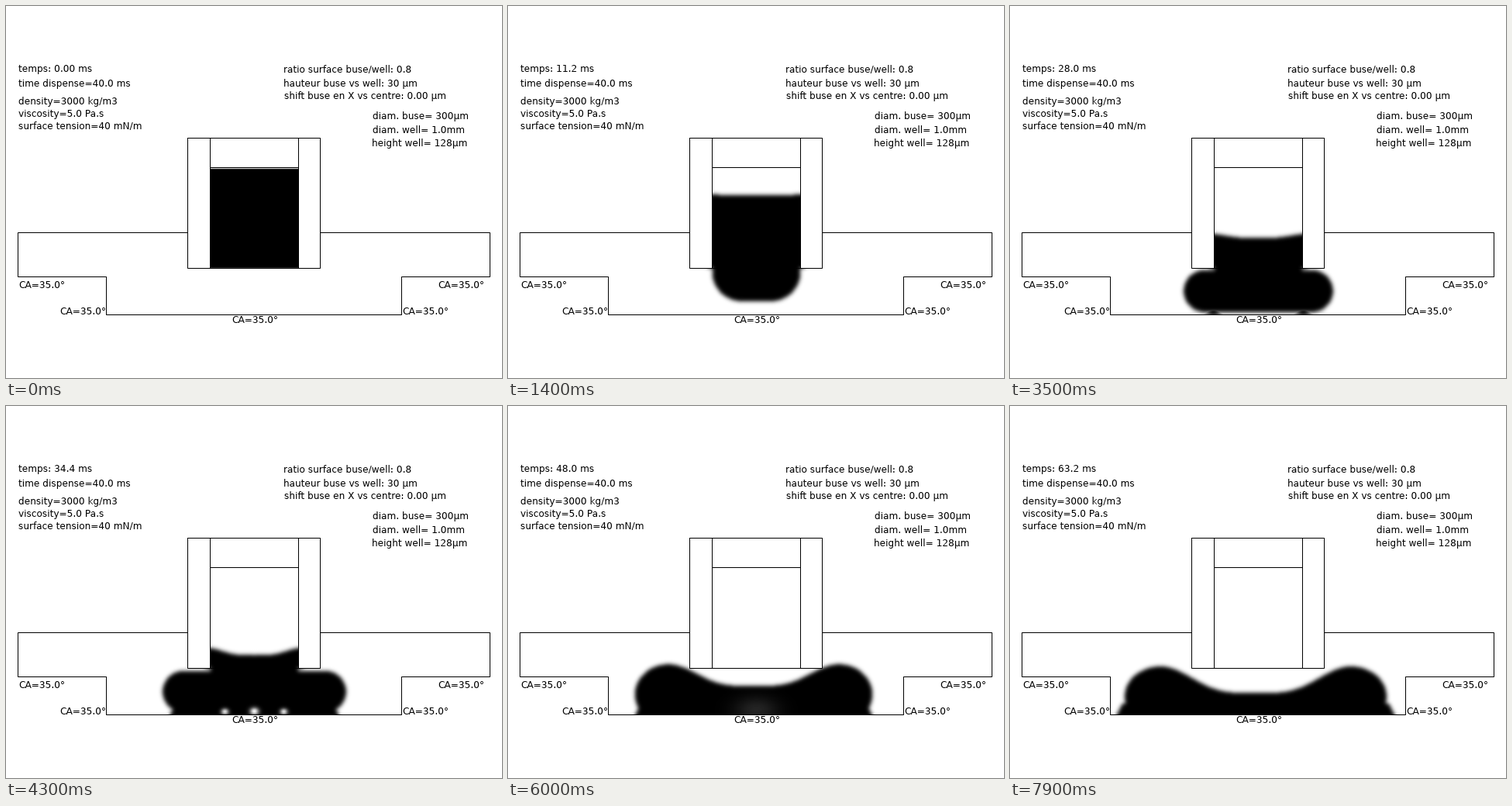
A matplotlib script for the animation above (8000 ms loop, 640 px wide and 480 px high).

```python
import numpy as np
import matplotlib.pyplot as plt
from matplotlib.animation import FuncAnimation

# Hinting at eight times the width keeps letter spacing close to natural.
plt.rcParams.update({
    "font.family": "DejaVu Sans",
    "font.size": 8.73,
    "text.hinting": "native",
    "text.hinting_factor": 8,
})

FRAMES, STEP = 80, 100
CX = 320.5                    # nozzle axis
BORE, RIM, LIP = 57, 86, 338  # nozzle inner and outer radius, lower edge
X0, X1, Y0, Y1, FLOOR = 120, 520, 190, 412, 398
TOP = 200                     # first visible row of the liquid

gx, gy = np.meshgrid(np.arange(X0, X1) + 0.5, np.arange(Y0, Y1) + 0.5)
centred = np.abs(gx - CX)
wall = (centred > BORE) & (centred < RIM) & (gy < LIP + 0.5)
freq2 = (np.fft.fftfreq(Y1 - Y0)[:, None] ** 2
         + np.fft.rfftfreq(X1 - X0)[None] ** 2)


def ease(t, a, b):
    u = np.clip((t - a) / (b - a), 0, 1)
    return u * u * (3 - 2 * u)


def mix(a, b, u):
    return a + (b - a) * u


def spot(x, y, sx, sy):
    return np.exp(-((centred - x) / sx) ** 2 / 2 - ((gy - y) / sy) ** 2 / 2)


def blur(a, sigma):
    gauss = np.exp(-2 * (np.pi * sigma) ** 2 * freq2)
    return np.fft.irfft2(np.fft.rfft2(a) * gauss, s=a.shape)


PATCH = spot(58, 395, 8, 5)
BUBBLES = 0.95 * spot(0, 394, 4.2, 3.5) + 0.85 * spot(38, 394.5, 3.6, 3)
GLOW = spot(0, 392, 20, 12)


def shape(t):
    """Coverage of the liquid at t seconds, before softening."""
    late = ease(t, 4.3, 6)
    off = np.abs(gx - CX + 3.5 * late)

    # pool: a slab with round ends that sinks, spreads and swells
    drop = 57 * (1 - np.exp(-0.55 * t - 0.32 * t * t))
    width = BORE + 116 * (1 - np.exp(-0.105 * max(t - 1.4, 0) ** 1.85))
    half = 27 + 11 * (1 - ease(t, 1.4, 2.3)) + 12 * late
    sag = 7 * ease(t, 3.5, 7.9)
    mid = LIP + drop - 27 - 11 * (1 - ease(t, 1.4, 2.3)) + sag
    end = half + sag
    pool = (np.maximum(off - width + end, 0) / end) ** 2 + ((gy - mid) / half) ** 2 < 1

    # upper surface: flat in the nozzle, later a trough between two humps
    if t < 4.3:
        level = 209.5 + 23.7 * t + 0.55 * t * t
    else:
        s = t - 4.3
        level = 370.5 - 49 * np.exp(-0.55 * s - 0.25 * s * s)
    crest = mix(62, width - end, late)
    rise = mix(0.12 * t**3, level - mid + half, late)
    surface = level - rise * np.sin(np.pi / 2 * np.minimum(off / crest, 1)) ** 4

    column = (off < np.where(gy < LIP, 64, BORE)) & (gy < LIP + 0.2 * drop)
    body = (gy > surface) & (column | pool)

    # wetted foot on the floor
    reach = width - 10 + 20 * ease(t, 4.3, 7.9)
    foot = (gy > 384) & (off < reach - 0.5 * (FLOOR - gy))
    return np.maximum(body, foot * ease(t, 3.4, 4.2))


def liquid(t):
    soft = blur(shape(t), mix(0.6, 2.7, min(t / 0.3, 1)))
    soft = np.maximum(soft, 0.9 * PATCH * ease(t, 3, 3.5) * (1 - ease(t, 4, 4.3)))
    soft *= 1 - BUBBLES * ease(t, 3.7, 4.2) * (1 - ease(t, 4.3, 5))
    soft *= 1 - 0.15 * GLOW * ease(t, 4.5, 5.4) * (1 - ease(t, 5.8, 7.2))
    soft[wall] = 0
    return 1 - np.clip(soft, 0, 1)[TOP - Y0:FLOOR - Y0]


fig = plt.figure(figsize=(6.4, 4.8), dpi=100, facecolor="white")
ax = fig.add_axes([0, 0, 1, 1])
ax.axis("off")
img = ax.imshow(liquid(0), cmap="gray", vmin=0, vmax=1, interpolation="nearest",
                extent=(X0, X1, FLOOR, TOP), aspect="auto", zorder=1)
ax.set(xlim=(0, 640), ylim=(480, 0))


def line(*pts):
    x, y = np.array(pts).T + 0.5
    ax.plot(x, y, color="black", lw=0.72, snap=False, zorder=2,
            solid_joinstyle="miter")


def label(x, y, s):
    return ax.text(x, y, s, color="black", va="baseline", ha="left", zorder=3)


line((234, 292), (15, 292), (15, 349), (129, 349), (129, 398),
     (510, 398), (510, 349), (624, 349), (624, 292), (406, 292))
line((234, 170), (405, 170), (405, 338), (234, 338), (234, 170))
line((263, 170), (263, 338))
line((377, 170), (377, 338))
line((263, 208), (377, 208))

clock = label(16, 85, "")
for x, y, s in [
    (16, 104, "time dispense=40.0 ms"),
    (16, 127, "density=3000 kg/m3"),
    (16, 143, "viscosity=5.0 Pa.s"),
    (16, 159, "surface tension=40 mN/m"),
    (358, 86, "ratio surface buse/well: 0.8"),
    (358, 104, "hauteur buse vs well: 30 µm"),
    (359, 120, "shift buse en X vs centre: 0.00 µm"),
    (473, 146, "diam. buse= 300µm"),
    (473, 164, "diam. well= 1.0mm"),
    (472, 181, "height well= 128µm"),
]:
    label(x, y, s)
for x, y in [(16, 364), (69, 398), (291, 409), (511, 398), (557, 364)]:
    label(x, y, "CA=35.0°")


def update(i):
    ms = 0.8 * i
    clock.set_text(f"temps: {ms:.{2 if ms < 9.99 else 1}f} ms")
    img.set_data(liquid(i * STEP / 1000))
    return img, clock


anim = FuncAnimation(fig, update, frames=FRAMES, interval=STEP,
                     repeat=True, repeat_delay=0)
plt.show()
```
